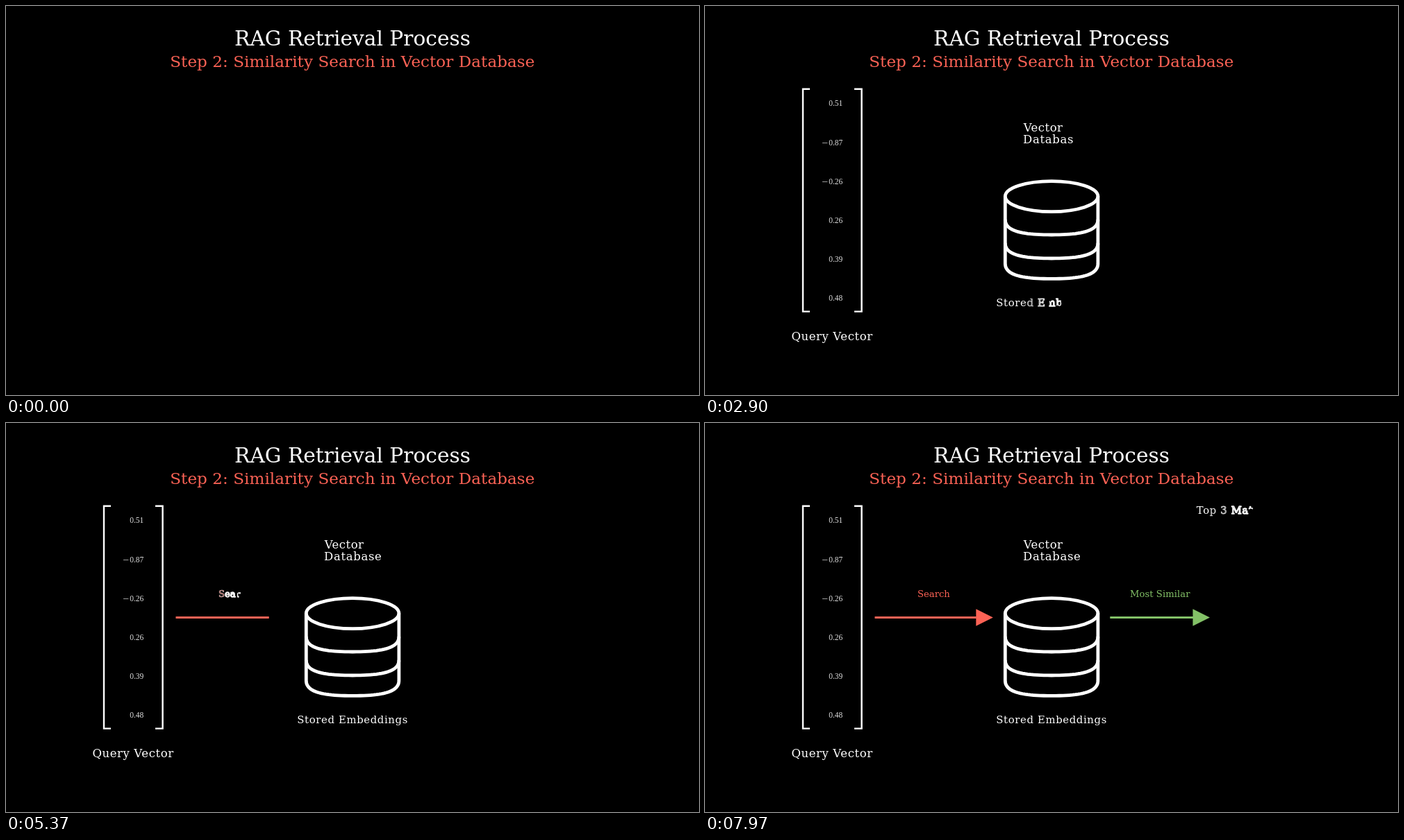
These frames come from a looping animation (998 by 561 pixels, 8000 ms). An HTML page with a canvas:

```html
<!DOCTYPE html>
<html lang="en">
<head>
<meta charset="utf-8">
<title>RAG Retrieval Process</title>
<style>
  html, body { margin: 0; width: 100%; height: 100%; overflow: hidden; background: #000; }
  canvas { display: block; }
</style>
</head>
<body>
<canvas id="stage" width="998" height="561"></canvas>
<script>
const ctx = document.getElementById('stage').getContext('2d');
const WHITE = '#ffffff', RED = '#fc6255', GREEN = '#83c167';
const LOOP = 8000, FPS = 30;

const clamp = v => Math.min(1, Math.max(0, v));
const sigmoid = v => 1 / (1 + Math.exp(-v));
const smooth = v => {
  const edge = sigmoid(-5);
  return clamp((sigmoid(10 * (clamp(v) - 0.5)) - edge) / (1 - 2 * edge));
};

// Text centred on x; drawLetter(char, x, y, index) counts only visible letters.
function layout(label, drawLetter) {
  const { text, x, y, size, spacing = 0 } = label;
  ctx.font = `${size}px "DejaVu Serif", serif`;
  ctx.letterSpacing = `${spacing}px`;
  const left = x - (ctx.measureText(text).width - spacing) / 2;
  let index = 0;
  [...text].forEach((char, i) => {
    if (char === ' ') return;
    const offset = ctx.measureText(text.slice(0, i + 1)).width - ctx.measureText(char).width;
    drawLetter(char, left + offset, y, index++);
  });
  ctx.letterSpacing = '0px';
}

// Outline of each letter is traced in white, then it thins out while the fill appears.
function write(label, time) {
  if (time <= 0) return;
  const { text, size, color = WHITE } = label;
  const count = text.replace(/ /g, '').length;
  const lag = Math.min(4 / (count + 1), 0.2);
  const duration = count < 15 ? 1 : 2;
  const value = time / duration * (1 + (count - 1) * lag);
  layout(label, (char, x, y, i) => {
    const progress = clamp(value - i * lag);
    if (progress <= 0) return;
    const outline = clamp(progress * 2), fill = clamp(progress * 2 - 1);
    ctx.save();
    ctx.lineJoin = 'round';
    if (fill < 1) {
      ctx.strokeStyle = WHITE;
      ctx.globalAlpha = 1 - fill * 0.5;
      ctx.lineWidth = 1.4 * (1 - fill);
      if (outline < 1) ctx.setLineDash([outline * size * 4, size * 20]);
      ctx.strokeText(char, x, y);
    }
    ctx.globalAlpha = fill;
    ctx.fillStyle = color;
    ctx.fillText(char, x, y);
    ctx.restore();
  });
}

function showLetters(label, value) {
  layout(label, (char, x, y, i) => {
    ctx.globalAlpha = smooth(value - i);
    ctx.fillStyle = WHITE;
    ctx.fillText(char, x, y);
  });
  ctx.globalAlpha = 1;
}

function polyline(points, progress) {
  const reach = progress * (points.length - 1);
  ctx.beginPath();
  ctx.moveTo(...points[0]);
  for (let i = 1; i < points.length && reach > i - 1; i++) {
    const part = Math.min(1, reach - i + 1), [ax, ay] = points[i - 1], [bx, by] = points[i];
    ctx.lineTo(ax + (bx - ax) * part, ay + (by - ay) * part);
  }
}

const matrixRows = ['0.51', '−0.87', '−0.26', '0.26', '0.39', '0.48'];

function drawMatrix(time) {
  if (time <= 0) return;
  const glyphs = matrixRows.join('').length;
  const value = time * (glyphs + 2);
  let index = 0;
  ctx.font = '11.5px "Liberation Serif", "Times New Roman", serif';
  ctx.fillStyle = '#dedede';
  matrixRows.forEach((row, r) => {
    const y = 144.4 + 56.1 * r;
    const digits = row.replace('−', '');
    const left = 198.3 - ctx.measureText(digits).width;
    if (row !== digits) {
      ctx.globalAlpha = smooth(value - index++);
      ctx.fillRect(169, y - 3.4, 7.4, 0.7);
    }
    [...digits].forEach((char, i) => {
      ctx.globalAlpha = smooth(value - index++);
      ctx.fillText(char, left + ctx.measureText(digits.slice(0, i)).width, y);
    });
  });
  ctx.globalAlpha = 1;
  ctx.strokeStyle = WHITE;
  ctx.lineWidth = 2.4;
  [[151, 141], [215, 225.6]].forEach(([hook, side], i) => {
    const progress = smooth(value - glyphs - i);
    if (progress <= 0) return;
    polyline([[hook, 119.8], [side, 119.8], [side, 440.6], [hook, 440.6]], progress);
    ctx.stroke();
  });
}

const CYLINDER = { x: 499.1, rx: 66.8, ry: 22, top: 274.6, base: 371.4 };

// Squarish lower rim from left to right: two mirrored cubic curves.
function rim(y) {
  const { x, rx, ry } = CYLINDER, handle = 0.7, steps = 24;
  return Array.from({ length: 2 * steps + 1 }, (_, i) => {
    const offset = i / steps - 1, u = Math.abs(offset), v = 1 - u;
    const across = 3 * u * v * v * handle + 3 * u * u * v + u ** 3;
    const down = v ** 3 + 3 * v * v * u + 3 * v * u * u * handle;
    return [x + Math.sign(offset) * across * rx, y + down * ry];
  });
}

function drawCylinder(value) {
  const { x, rx, ry, top, base } = CYLINDER;
  ctx.strokeStyle = WHITE;
  ctx.lineWidth = 4.8;
  const steps = [
    p => {
      ctx.beginPath();
      ctx.ellipse(x, top, rx, ry, 0, 0, 2 * Math.PI * p);
    },
    p => polyline([[x - rx, top], ...rim(base), [x + rx, top]], p),
    p => polyline(rim(308), p),
    p => polyline(rim(342), p)
  ];
  steps.forEach((trace, i) => {
    const progress = smooth(value - i);
    if (progress <= 0) return;
    trace(progress);
    ctx.stroke();
  });
}

function drawArrow(from, to, color, time) {
  const y = 280.5, neck = to - 24.5;
  const shaft = smooth(time * 2), tip = smooth(time * 2 - 1);
  if (shaft <= 0) return;
  ctx.strokeStyle = ctx.fillStyle = color;
  ctx.lineWidth = 2.9;
  polyline([[from, y], [neck + 0.5, y]], shaft);
  ctx.stroke();
  if (tip <= 0) return;
  polyline([[to, y], [neck, y - 12.2], [neck, y + 12.2], [to, y]], tip);
  ctx.fill();
}

const title = { text: 'RAG Retrieval Process', x: 499, y: 57.4, size: 29.66 };
const subtitle = { text: 'Step 2: Similarity Search in Vector Database', x: 498.8, y: 88, size: 23.06, spacing: 0.06, color: RED };
const queryLabel = { text: 'Query Vector', x: 182.8, y: 482.2, size: 16.48, spacing: 0.62 };
const databaseLabel = [
  { text: 'Vector', x: 486.8, y: 180.5, size: 16.48, spacing: 0.5 },
  { text: 'Database', x: 499.4, y: 197.5, size: 16.48, spacing: 0.68 }
];
const storedLabel = { text: 'Stored Embeddings', x: 498.8, y: 432.7, size: 14.83, spacing: 0.65 };
const searchLabel = { text: 'Search', x: 329.4, y: 250.7, size: 13.18, color: RED };
const similarLabel = { text: 'Most Similar', x: 655.2, y: 250.7, size: 13.18, spacing: 0.06, color: GREEN };
const matchesLabel = { text: 'Top 3 Matches', x: 766.8, y: 130.5, size: 14.83, spacing: 0.65 };

function draw(time) {
  ctx.fillStyle = '#000';
  ctx.fillRect(0, 0, 998, 561);
  write(title, 9);
  write(subtitle, 9);

  drawMatrix(time);
  write(queryLabel, time);

  // Cylinder strokes and label letters appear one after another.
  const databaseStep = (time - 2) * 19;
  if (databaseStep > 0) {
    drawCylinder(databaseStep);
    showLetters(databaseLabel[0], databaseStep - 4);
    showLetters(databaseLabel[1], databaseStep - 10);
  }
  write(storedLabel, time - 2);

  drawArrow(244.5, 414.8, RED, time - 5);
  write(searchLabel, time - 5);
  drawArrow(583.3, 727, GREEN, time - 6.53);
  write(similarLabel, time - 6.53);
  write(matchesLabel, time - 7.53);
}

function tick() {
  const ms = performance.now() % LOOP;
  draw(Math.floor((ms + 5) * FPS / 1000) / FPS);
  requestAnimationFrame(tick);
}
tick();
</script>
</body>
</html>
```
